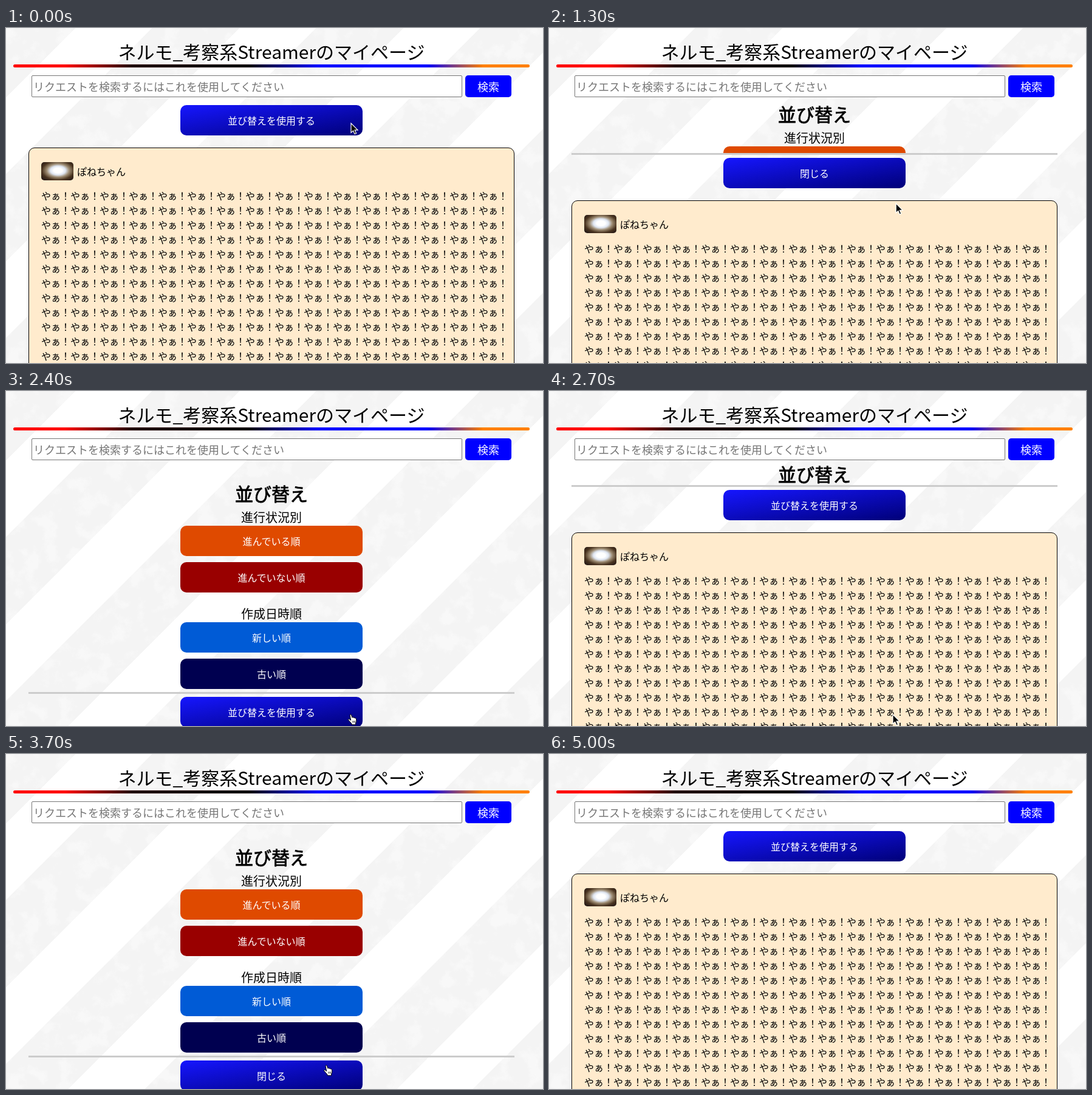
Animation of 884 by 552 pixels, one loop 5.1 s. Source, as an HTML page:

```html
<!DOCTYPE html>
<html lang="ja">
<head>
<meta charset="utf-8">
<title>マイページ</title>
<style>
html, body { margin: 0; width: 100%; height: 100%; overflow: hidden; }
body {
  position: relative; color: #000;
  font: 350 16px/24px "Noto Sans CJK JP", "Noto Sans CJK", "Noto Sans JP", sans-serif;
  background: repeating-linear-gradient(135deg, #f4f4f4 0 81px, #fff 81px 170px, #f4f4f4 170px 191px);
}
body * { position: absolute; box-sizing: border-box; margin: 0; white-space: nowrap; }
#stage { left: 0; top: 0; width: 884px; height: 552px; overflow: hidden; }
#grain { left: 0; top: 0; }
h1, h2, h3 { left: 37px; width: 800px; text-align: center; font-weight: 350; }
h1 { top: 16px; font-size: 30px; line-height: 44px; }
h2 { top: 146px; font-size: 30px; line-height: 44px; font-weight: 400; -webkit-text-stroke: .8px #000; }
h3 { font-size: 20px; line-height: 30px; }
.bar {
  left: 12px; top: 60px; width: 850px; height: 5px; border-radius: 3px;
  background: linear-gradient(90deg, red 10%, #200000 23%, #0a0000 45%, #00f 59%, #00f 80%, #ff8000 91%);
}
.field {
  left: 42px; top: 78px; width: 709px; height: 36px; padding-left: 2px;
  border: 1px solid #767676; border-radius: 2px; background: #fff;
  color: #757575; font-size: 18px; line-height: 34px;
}
.find {
  left: 756px; top: 78px; width: 76px; height: 36px; border-radius: 5px;
  background: #00f; color: #fff; font-size: 18px; line-height: 36px; text-align: center;
}
.btn {
  left: 287px; width: 300px; height: 50px; border-radius: 10px;
  color: #fff; line-height: 50px; text-align: center;
}
#toggle { top: 127px; background: linear-gradient(to bottom right, #1616ff, #000078); }
#panel { left: 0; top: 0; width: 884px; overflow: hidden; }
#list { left: 0; top: 0; width: 884px; height: 552px; }
#line { left: 37px; top: 119px; width: 800px; height: 3px; background: #ccc; }
#below { left: 0; top: 0; width: 884px; height: 552px; }
.card {
  left: 37px; top: 197px; width: 800px; height: 420px;
  border: 1px solid #000; border-radius: 10px; background: #ffebcd;
}
.face {
  left: 20px; top: 23px; width: 53px; height: 30px; border-radius: 5px;
  background: radial-gradient(ellipse at 52% 46%, #fff 18%, #dfe6f2 32%, #9c8a70 48%, #4a3420 68%, #150e12 100%);
}
.name { left: 79px; top: 26px; }
#text { left: 20px; top: 66px; width: 771px; white-space: normal; word-break: break-all; }
#cursor { left: 0; top: 0; overflow: visible; }
</style>
</head>
<body>
<div id="stage">
  <svg id="grain" width="884" height="552">
    <filter id="noise" x="0" y="0" width="1" height="1">
      <feTurbulence type="fractalNoise" baseFrequency=".035" numOctaves="4" seed="4"/>
      <feColorMatrix values="0 0 0 0 1  0 0 0 0 1  0 0 0 0 1  5 0 0 0 -2.5"/>
    </filter>
    <rect width="884" height="552" filter="url(#noise)" opacity=".4"/>
  </svg>

  <h1>ネルモ_考察系Streamerのマイページ</h1>
  <div class="bar"></div>
  <div class="field">リクエストを検索するにはこれを使用してください</div>
  <div class="find">検索</div>

  <div id="panel">
    <div id="list">
      <h2>並び替え</h2>
      <h3 style="top:193px">進行状況別</h3>
      <div class="btn" style="top:222px;background:#df4a00">進んでいる順</div>
      <div class="btn" style="top:282px;background:#990000">進んでいない順</div>
      <h3 style="top:352px">作成日時順</h3>
      <div class="btn" style="top:381px;background:#005bd6">新しい順</div>
      <div class="btn" style="top:441px;background:#000050">古い順</div>
    </div>
  </div>

  <div id="below">
    <div id="line"></div>
    <div class="btn" id="toggle"></div>
    <div class="card">
      <div class="face"></div>
      <div class="name">ぽねちゃん</div>
      <div id="text"></div>
    </div>
  </div>

  <svg id="cursor" width="16" height="20">
    <path id="arrow" d="M3 0V15.5L6.6 12.2 9 17.8 11.6 16.7 9.2 11.2H14Z"
      fill="#000" stroke="#fff" stroke-width="1.2"/>
    <g id="hand" stroke="#000">
      <path fill="#fff" d="M3.2 1.5C2.8-.2 4.9-.8 5.5.9L6.8 5.2C7.3 4.2 8.8 4.3 9.2 5.5 9.8 4.8 11 5 11.3 6.2 12 5.6 13.2 6 13.4 7.2 13.8 9.4 14.2 12 12.6 14V16.8H6.4L5.8 15C4.3 13 2 10.8.6 9 0 7.8 1.4 7 2.6 8L4.6 9.6Z"/>
      <path fill="none" stroke-width=".8" d="M7.8 10.5v3M9.7 10.5v3M11.5 10.5v3"/>
    </g>
  </svg>
</div>

<script>
const LOOP = 5100, STEP = 100, SLIDE = 400, DROP = 379;
const clicks = [1173, 2380, 3312, 4350];
const rows = [222, 282, 381, 441];
// time, x, y
const path = [
  [0, 565, 157], [300, 565, 157], [700, 569, 159], [1180, 569, 159],
  [1450, 567, 474], [1600, 567, 474], [2000, 563, 533], [2700, 563, 533],
  [3150, 551, 155], [3320, 551, 155], [3650, 523, 513], [LOOP, 523, 513]
];
const $ = id => document.getElementById(id);
const swing = k => .5 - Math.cos(Math.PI * Math.min(1, Math.max(0, k))) / 2;
const show = (el, on) => { el.style.visibility = on ? 'visible' : 'hidden'; };

$('text').textContent = 'やぁ！'.repeat(16 * 13);

function pointer(t) {
  const i = path.findIndex(p => p[0] > t);
  const [a, x, y] = path[i - 1], [b, u, v] = path[i];
  const k = swing((t - a) / (b - a));
  return [x + (u - x) * k, y + (v - y) * k];
}

function draw(t) {
  const open = clicks.reduce((s, c, i) => s + (i % 2 ? -1 : 1) * swing((t - c) / SLIDE), 0);
  const active = open > .0001;
  const drop = Math.round(DROP * open);
  const shift = Math.round(.62 - 36 * (1 - open));

  $('below').style.transform = `translateY(${drop}px)`;
  $('list').style.transform = `translateY(${shift}px)`;
  $('panel').style.height = 119 + drop + 'px';
  show($('panel'), active);
  show($('line'), active);
  const pressed = clicks.filter(c => c <= t).length;
  $('toggle').textContent = pressed % 2 ? '閉じる' : '並び替えを使用する';

  const [x, y] = pointer(t);
  const tip = y + 2;
  const within = top => tip >= top && tip <= top + 50;
  const overRow = active && tip < 119 + drop && rows.some(r => within(r + shift));
  const hand = t >= 300 && (within(127 + drop) || overRow);
  const seen = t < 4950;
  $('cursor').style.transform = `translate(${x}px, ${y}px)`;
  show($('hand'), seen && hand);
  show($('arrow'), seen && !hand);
}

const start = performance.now();
function tick() {
  const t = (performance.now() - start) % LOOP;
  draw(Math.floor(t / STEP) * STEP);
  requestAnimationFrame(tick);
}
tick();
</script>
</body>
</html>
```
